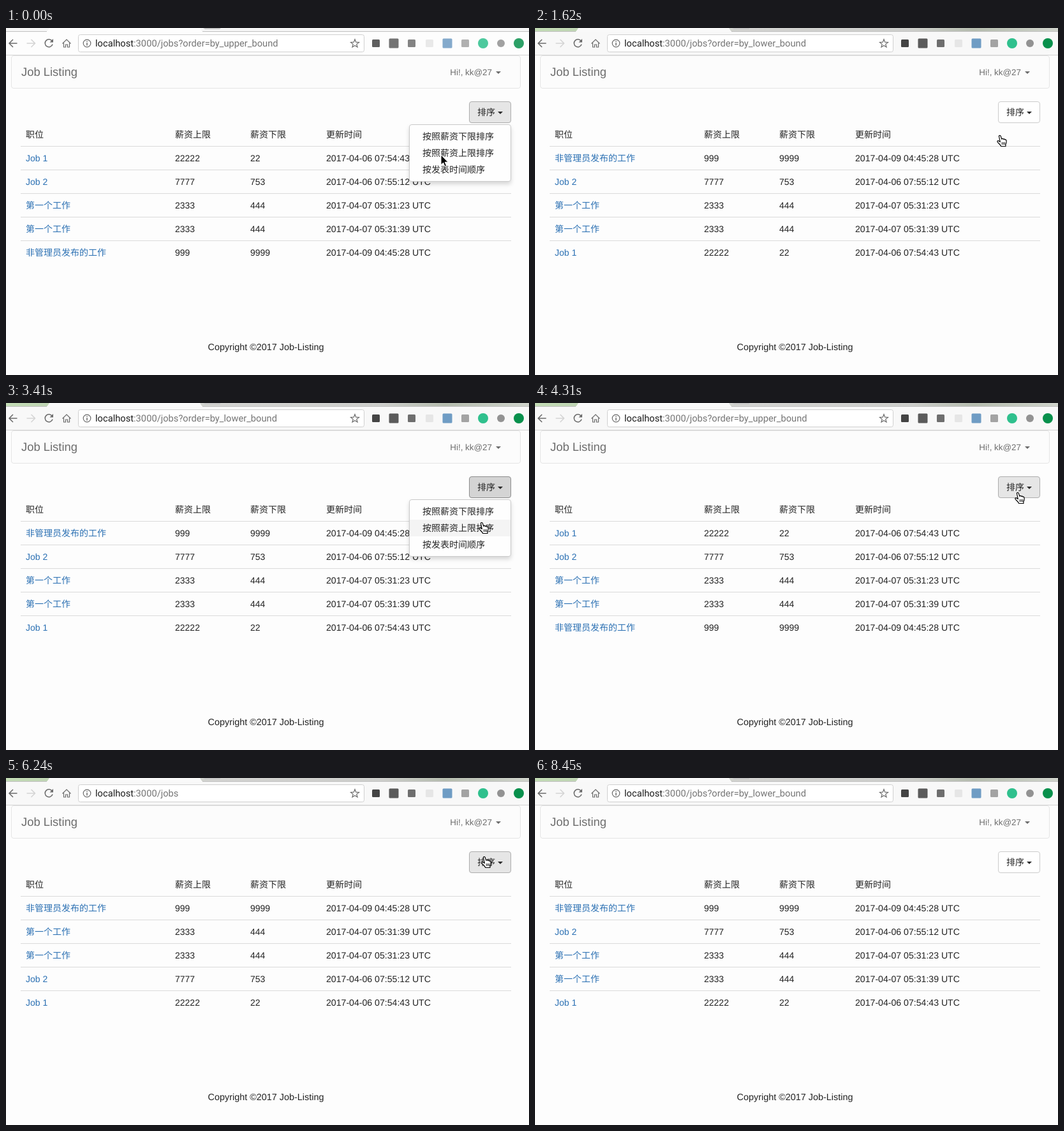
Write an HTML page that moves like this. It is 820 by 544 pixels and loops after 8900 ms.

```html
<!DOCTYPE html>
<html lang="zh">
<head>
<meta charset="utf-8">
<title>Job Listing</title>
<style>
  html, body { margin: 0; width: 100%; height: 100%; overflow: hidden; background: #fdfdfd; }
  svg { display: block; width: 820px; height: 544px; }
  text { font: 14px "Liberation Sans", "Noto Sans CJK SC", "Noto Sans CJK", sans-serif; fill: #222; white-space: pre; text-rendering: geometricPrecision; }
  #table .link { fill: #2b70b3; }
  #table .date { font-size: 14.12px; }
  #url { font: 14.7px Roboto, sans-serif; fill: #757575; }
  #url .host { fill: #1c1c1c; }
  .icon { fill: none; stroke: #6b6b6b; stroke-width: 1.5; }
  .icon .thin { stroke-width: 1.2; }
  #panel { filter: drop-shadow(0 4px 3px rgba(0, 0, 0, .15)); }
</style>
</head>
<body>
<svg viewBox="0 0 820 544">
  <defs>
    <linearGradient id="strip">
      <stop offset="0" stop-color="#c3dcb5"/>
      <stop offset=".1" stop-color="#bfd4b4"/>
      <stop offset=".4" stop-color="#d3d3d1"/>
      <stop offset=".72" stop-color="#cdcecb"/>
      <stop offset=".84" stop-color="#b5bcae"/>
      <stop offset="1" stop-color="#d0d4cc"/>
    </linearGradient>
  </defs>
  <rect width="820" height="544" fill="#fdfdfd"/>

  <rect id="bar" width="820" height="42"/>
  <rect id="tabs" width="820" height="5"/>
  <path d="M0 5.5H64M308 5.5H820" stroke="#c0c0c0"/>
  <path id="tab" d="M64 6L68 0H304L308 6Z"/>
  <path d="M309 0H337L335 2H312Z" fill="#c6c6c6"/>
  <rect y="42" width="820" height="1" fill="#d3d3d3"/>

  <g class="icon">
    <path d="M17.5 24H5.5M11 18L5 24L11 30"/>
    <path d="M32.5 24H45M39.5 18L45.5 24L39.5 30" stroke="#d4d4d4"/>
    <path d="M72.3 20.5A6 6 0 1 0 73 25.5"/>
    <path d="M74 17V22.5H68.5Z" fill="#6b6b6b" stroke="none"/>
    <path class="thin" d="M88.5 24.5L95 18L101.500 24.5M90.5 23.5V30H93.5V26H96.5V30H99.5V23.5"/>
  </g>
  <rect x="113.5" y="10.5" width="448" height="27" rx="3" fill="#fff" stroke="#d0d0d0"/>
  <g class="icon">
    <circle class="thin" cx="127" cy="24" r="5.8"/>
    <path d="M127 23V27.5M127 20.3V21.8"/>
    <path class="thin" id="star"/>
  </g>
  <text id="url" x="140" y="29"><tspan class="host">localhost</tspan>:3000/jobs<tspan id="query"></tspan></text>
  <g id="badges"></g>

  <rect x="8.5" y="43.5" width="798" height="51" rx="3.5" fill="#fcfcfc" stroke="#e5e5e5"/>
  <text x="24" y="75" style="font-size:18.4px;fill:#6c6c6c">Job Listing</text>
  <text x="762" y="74" text-anchor="end" style="font-size:13.4px;fill:#6c6c6c">Hi!, kk@27</text>
  <path d="M768 68H776L772 72Z" fill="#6c6c6c"/>

  <g id="table"></g>
  <text x="407.5" y="505" text-anchor="middle" style="font-size:14.4px">Copyright ©2017 Job-Listing</text>

  <g id="sort">
    <rect id="button" x="726.5" y="115.5" width="65" height="33" rx="3.5"/>
    <text x="739" y="137">排序</text>
    <path d="M771 131H779L775 135Z" fill="#2b2b2b"/>
  </g>
  <g id="menu">
    <rect id="panel" x="632.5" y="151.5" width="159" height="89" rx="3.5" fill="#fefefe" stroke="#cacaca"/>
    <rect id="hover" x="633" width="158" height="26" fill="#f4f4f4"/>
  </g>

  <path id="arrow" d="M0 0V15.5L3.6 12.2L6 18L8.6 17L6.2 11.3H11Z" fill="#000" stroke="#fff"/>
  <g id="hand" fill="#fff" stroke="#000" stroke-width="1.2" stroke-linejoin="round">
    <path d="M3.5 2C3 .3 5.6 -.2 6.3 1.6L7.8 6.2C8.3 5 10.3 5.2 10.6 6.6C11.3 5.7 12.8 6.1 13.1 7.3C14 6.8 15 7.4 15.1 8.6C15.3 11 14.8 13 13.9 14.6V17.5H6.8C6.2 15.5 3.5 13.5 1.3 10.8C.2 9.3 1.8 8 3.3 9.2L5.3 10.6Z"/>
    <path d="M8.3 11V15M10.4 11V15M12.4 11V15" stroke-width=".9"/>
  </g>
</svg>
<script>
const $ = id => document.getElementById(id);
const NS = 'http://www.w3.org/2000/svg';
const LOOP = 8900;

function add(parent, tag, attrs, text = '') {
  const el = document.createElementNS(NS, tag);
  for (const key in attrs) el.setAttribute(key, attrs[key]);
  el.textContent = text;
  return parent.appendChild(el);
}
const set = (id, attrs) => Object.entries(attrs).forEach(([k, v]) => $(id).setAttribute(k, v));
const show = (id, on) => set(id, { visibility: on ? 'visible' : 'hidden' });

const jobs = [
  ['Job 1', '22222', '22', '2017-04-06 07:54:43 UTC'],
  ['Job 2', '7777', '753', '2017-04-06 07:55:12 UTC'],
  ['第一个工作', '2333', '444', '2017-04-07 05:31:23 UTC'],
  ['第一个工作', '2333', '444', '2017-04-07 05:31:39 UTC'],
  ['非管理员发布的工作', '999', '9999', '2017-04-09 04:45:28 UTC']
];
const pages = {
  upper: { query: '?order=by_upper_bound', order: [0, 1, 2, 3, 4] },
  lower: { query: '?order=by_lower_bound', order: [4, 1, 2, 3, 0] },
  all: { query: '', order: [4, 3, 2, 1, 0] }
};
const columns = [31, 265, 383, 502];
const styles = ['link', 'number', 'number', 'date'];
const buttonStyle = {
  idle: ['#fff', '#ccc'],
  over: ['#e6e6e6', '#adadad'],
  down: ['#d4d4d4', '#8c8c8c']
};

// Static parts
$('star').setAttribute('d', 'M' + Array.from({ length: 10 }, (_, i) => {
  const a = i * Math.PI / 5, r = i % 2 ? 2.9 : 6.8;
  return `${547 + r * Math.sin(a)} ${24.5 - r * Math.cos(a)}`;
}).join('L') + 'Z');

['#444', '#5b5b5b', '#6e6e6e', '#e6e6e6', '#6f9cc4', '#a3a3a3', '#2fc08d', '#929292', '#08904c'].forEach((fill, i) => {
  const x = 580 + 28 * i;
  if (i > 5) add($('badges'), 'circle', { cx: x, cy: 24, r: i === 7 ? 6 : 8, fill });
  else {
    const s = i === 1 || i === 4 ? 15 : 12;
    add($('badges'), 'rect', { x: x - s / 2, y: 24 - s / 2, width: s, height: s, rx: 1.5, fill });
  }
});

['职位', '薪资上限', '薪资下限', '更新时间'].forEach((t, i) => add($('table'), 'text', { x: columns[i], y: 172 }, t));
const cells = jobs.map((_, row) => {
  add($('table'), 'rect', { x: 23, y: 185 + 37 * row, width: 769, height: 1, fill: '#dadada' });
  return columns.map((x, i) => add($('table'), 'text', { x, y: 209 + 37 * row, class: styles[i] }));
});
['按照薪资下限排序', '按照薪资上限排序', '按发表时间顺序'].forEach((t, i) =>
  add($('menu'), 'text', { x: 653, y: 175 + 26 * i }, t));

// Poses: time, pointer, x, y, page, button, open menu, highlighted item
const poses = [
  [0, 'arrow', 682, 199, 'upper', 'over', 1],
  [130, 'arrow', 684, 201, 'upper', 'over', 1],
  [310, 'arrow', 686, 202, 'upper', 'over', 1],
  [700, 'arrow', 688, 202, 'upper', 'over', 1],
  [1010, 'arrow', 698, 204, 'upper', 'over', 1],
  [1140, 'arrow', 703, 205, 'upper', 'over', 1],
  [1290, 'hand', 712, 186, 'upper', 'over', 1, 2],
  [1440, 'hand', 722, 168, 'upper', 'over', 1, 1],
  [1590, 'hand', 724, 168, 'lower', 'idle'],
  [1770, 'arrow', 728, 168, 'lower', 'idle'],
  [2210, 'arrow', 745, 205, 'lower', 'idle'],
  [2360, 'arrow', 762, 180, 'lower', 'idle'],
  [2510, 'hand', 770, 146, 'lower', 'over'],
  [2660, 'hand', 768, 143, 'lower', 'over'],
  [2960, 'hand', 768, 143, 'lower', 'down', 1],
  [3110, 'hand', 764, 152, 'lower', 'down', 1],
  [3260, 'hand', 752, 171, 'lower', 'down', 1, 1],
  [3410, 'hand', 741, 187, 'lower', 'down', 1, 2],
  [3710, 'hand', 741, 187, 'upper', 'idle'],
  [3860, 'arrow', 746, 188, 'upper', 'idle'],
  [4160, 'arrow', 750, 172, 'upper', 'idle'],
  [4310, 'hand', 752, 140, 'upper', 'over'],
  [4460, 'hand', 754, 130, 'upper', 'over'],
  [4760, 'hand', 754, 130, 'upper', 'down', 1],
  [4910, 'hand', 750, 158, 'upper', 'down', 1, 1],
  [5060, 'hand', 738, 192, 'upper', 'down', 1, 2],
  [5200, 'hand', 725, 222, 'upper', 'down', 1, 3],
  [5500, 'hand', 725, 222, 'all', 'idle'],
  [5650, 'arrow', 730, 222, 'all', 'idle'],
  [5800, 'arrow', 735, 200, 'all', 'idle'],
  [5940, 'arrow', 743, 164, 'all', 'idle'],
  [6090, 'hand', 744, 132, 'all', 'over'],
  [6240, 'hand', 745, 123, 'all', 'over'],
  [6530, 'hand', 745, 123, 'all', 'down', 1],
  [6680, 'hand', 741, 140, 'all', 'down', 1],
  [6830, 'hand', 735, 158, 'all', 'down', 1, 1],
  [6980, 'hand', 732, 161, 'all', 'down', 1, 1],
  [7120, 'hand', 732, 161, 'lower', 'idle'],
  [7270, 'arrow', 736, 161, 'lower', 'idle'],
  [7710, 'arrow', 715, 272, 'lower', 'idle'],
  [7860, 'arrow', 671, 397, 'lower', 'idle'],
  [8160, 'arrow', 720, 470, 'lower', 'idle'],
  [8310, 'arrow', 747, 521, 'lower', 'idle'],
  [8450, '', 0, 0, 'lower', 'idle']
];

function draw(time) {
  const [start, pointer, x, y, page, button, open, item] = poses.findLast(p => p[0] <= time);
  const focused = start > 0;
  set('bar', { fill: focused ? '#f8f8f8' : '#fdfdfd' });
  set('tabs', { fill: focused ? 'url(#strip)' : '#f6f6f6' });
  set('tab', { fill: focused ? '#f9f9f9' : '#fdfdfd' });
  set('badges', { opacity: focused ? 1 : .85 });

  const { query, order } = pages[page];
  $('query').textContent = query;
  order.forEach((job, row) => cells[row].forEach((cell, i) => { cell.textContent = jobs[job][i]; }));

  const [fill, stroke] = buttonStyle[button];
  set('button', { fill, stroke });
  set('menu', { display: open ? 'inline' : 'none' });
  show('hover', open && item);
  if (item) set('hover', { y: 131 + 26 * item });

  for (const id of ['arrow', 'hand']) {
    show(id, id === pointer);
    set(id, { transform: `translate(${x} ${y})` });
  }
}

const begin = performance.now();
function tick() {
  draw((performance.now() - begin) % LOOP);
  requestAnimationFrame(tick);
}
tick();
</script>
</body>
</html>
```
